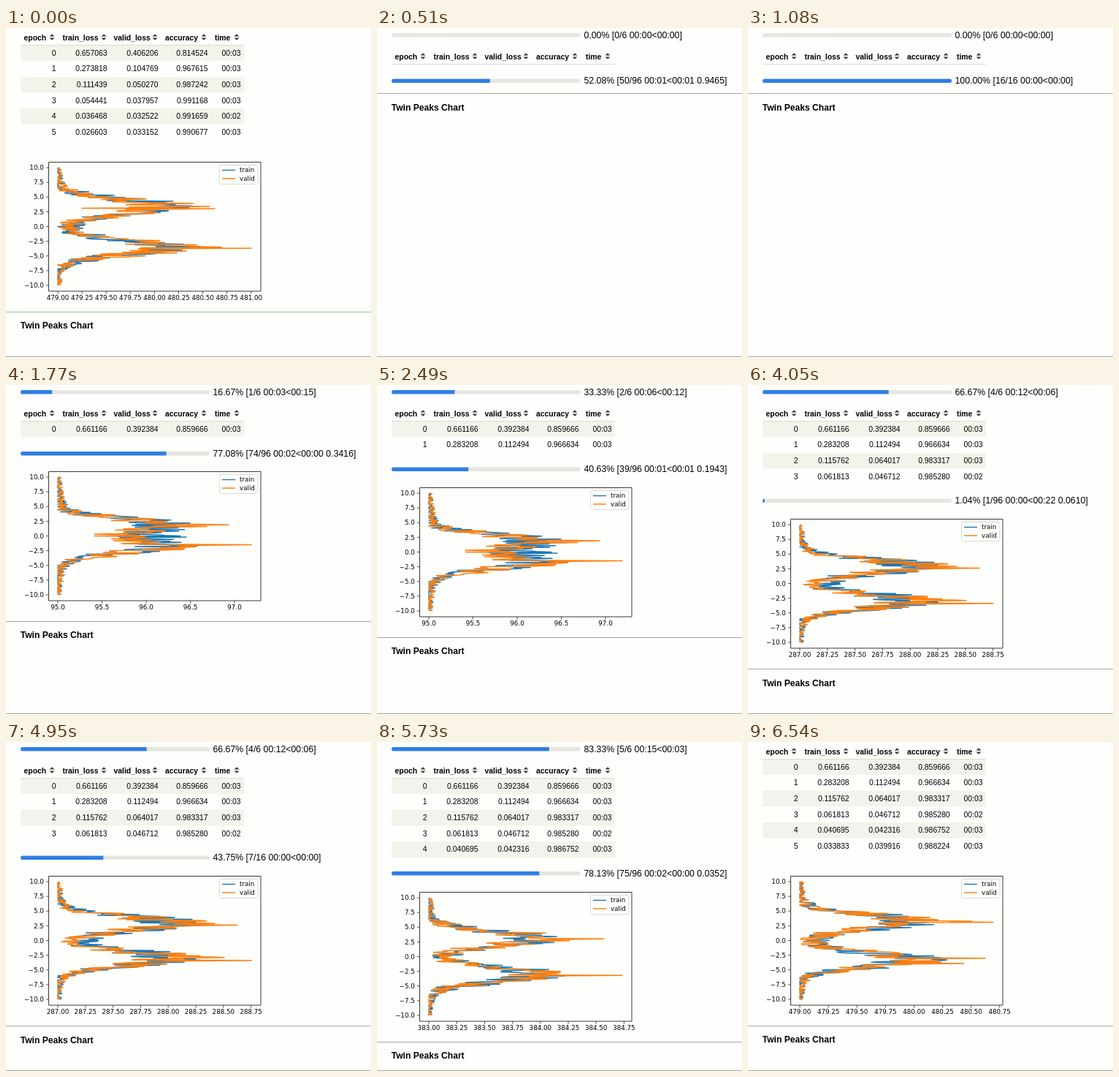
An HTML page with a canvas for the animation above (6.57 s loop, 500 by 450 pixels).

```html
<!DOCTYPE html>
<html lang="en">
<head>
<meta charset="utf-8">
<title>Twin Peaks Chart</title>
<style>
html, body { margin: 0; width: 100%; height: 100%; overflow: hidden; background: #fefefc; }
canvas { display: block; width: 500px; height: 450px; }
</style>
</head>
<body>
<canvas id="stage" width="500" height="450"></canvas>
<script>
const ctx = document.getElementById('stage').getContext('2d');
const LOOP = 6570;
const SANS = '"Liberation Sans", Arial, sans-serif';
const PLOT = '"DejaVu Sans", sans-serif';
const BLUE = '#1f77b4', ORANGE = '#ff7f0e', PAPER = '#fefefc', RULE = '#a8a8a0';
const ROW = 21.65;

// epoch start times; the last entry ends the run
const STARTS = [60, 1120, 2170, 3110, 4035, 5085, 6120];
const LOSS_BEND = [0.5, 0.96, 0.96, 0.96, 0.756, 0.96];

const OLD_ROWS = [
  ['0.657063', '0.406206', '0.814524', '00:03'],
  ['0.273818', '0.104769', '0.967615', '00:03'],
  ['0.111439', '0.050270', '0.987242', '00:03'],
  ['0.054441', '0.037957', '0.991168', '00:03'],
  ['0.036468', '0.032522', '0.991659', '00:02'],
  ['0.026603', '0.033152', '0.990677', '00:03']
];
const ROWS = [
  ['0.661166', '0.392384', '0.859666', '00:03'],
  ['0.283208', '0.112494', '0.966634', '00:03'],
  ['0.115762', '0.064017', '0.983317', '00:03'],
  ['0.061813', '0.046712', '0.985280', '00:02'],
  ['0.040695', '0.042316', '0.986752', '00:03'],
  ['0.033833', '0.039916', '0.988224', '00:03']
];

// left label, arrow centre, right edge of the cells
const COLS = [
  ['epoch', 24.5, 63, 68.5],
  ['train_loss', 77.5, 134, 138.5],
  ['valid_loss', 147.5, 204, 208.5],
  ['accuracy', 218, 271, 276.5],
  ['time', 286, 316, 321.5]
];

function random(seed) {
  return () => {
    seed = (seed * 16807) % 2147483647;
    return seed / 2147483647;
  };
}

function bell(x, w) { return Math.exp(-x * x / (2 * w * w)); }

// noisy counts: the spread grows with the root of the mean
function curve(seed, c, mid, spikes) {
  const rnd = random(seed);
  const pts = [];
  for (let i = 0; i <= 200; i++) {
    const y = 10 - i / 10;
    const mean = c.amp * (bell(y - c.up, c.w) + bell(y + c.down, c.w)) + mid * bell(y, 0.8) + 6 * bell(y, 5);
    const x = mean + 4.4 * Math.sqrt(mean) * (rnd() * 2 - 1);
    pts.push([Math.max(0, Math.min(225, x)), y]);
  }
  for (const [y, x] of spikes) pts[Math.round((10 - y) * 10)][0] = x;
  return pts;
}

function chart(seed, c) {
  c.train = curve(seed * 7919, c, c.mid, c.blue || []);
  c.valid = curve(seed * 104729, c, 4, c.spikes);
  return c;
}

const OLD_CHART = chart(11, { from: 479, step: 0.25, gap: 33.1, up: 3.4, down: 3.6, amp: 145, w: 1.25, mid: 6,
  spikes: [[3.4, 208], [3.1, 33], [3, 215], [-3.5, 224], [-3.7, 265]] });
const CHARTS = [
  chart(23, { from: 95, step: 0.5, gap: 60.5, up: 1.9, down: 1.8, amp: 135, w: 1.15, mid: 45,
    spikes: [[1.9, 234], [1.6, 204], [-1.5, 265], [-1.8, 190]] }),
  chart(37, { from: 191, step: 0.25, gap: 35.2, up: 2.6, down: 2.6, amp: 148, w: 1.15, mid: 35,
    spikes: [[2.7, 238], [2.4, 212], [-2.5, 205], [-2.9, 212]], blue: [[-2.7, 265]] }),
  chart(41, { from: 287, step: 0.25, gap: 37.8, up: 2.9, down: 3, amp: 155, w: 1.2, mid: 12,
    spikes: [[2.6, 246], [2.9, 215], [-2.9, 228], [-3.4, 265]] }),
  chart(53, { from: 383, step: 0.25, gap: 38.2, up: 3.1, down: 3.1, amp: 152, w: 1.2, mid: 10,
    spikes: [[3, 240], [-3.2, 265]] }),
  chart(67, { from: 479, step: 0.25, gap: 39.1, up: 3.2, down: 3.3, amp: 152, w: 1.22, mid: 6,
    spikes: [[3.1, 265], [3.3, 235], [-3, 254], [-3.9, 225]] })
];

function text(s, x, y, font, align = 'left', color = '#000') {
  ctx.font = font;
  ctx.textAlign = align;
  ctx.fillStyle = color;
  ctx.fillText(s, x, y);
}

function line(x1, y1, x2, y2, color, width = 1) {
  ctx.strokeStyle = color;
  ctx.lineWidth = width;
  ctx.beginPath();
  ctx.moveTo(x1, y1);
  ctx.lineTo(x2, y2);
  ctx.stroke();
}

function pill(x, y, w, h, r, color) {
  ctx.fillStyle = color;
  ctx.beginPath();
  ctx.roundRect(x, y, w, h, r);
  ctx.fill();
}

function triangle(x, y, dy) {
  ctx.beginPath();
  ctx.moveTo(x - 3.5, y);
  ctx.lineTo(x + 3.5, y);
  ctx.lineTo(x, y + dy);
  ctx.fill();
}

function bar(y, done, total, note) {
  const part = done / total;
  pill(20, y - 2.8, 259, 5.6, 2.8, '#e6e6e0');
  if (part > 0) {
    ctx.save();
    ctx.clip();
    ctx.fillStyle = '#2f7fe6';
    ctx.fillRect(20, y - 3, 259 * part, 6);
    ctx.restore();
  }
  text(`${(part * 100).toFixed(2)}% [${done}/${total} ${note}]`, 283.5, y + 4, '12.3px ' + SANS);
}

function table(y, rows) {
  for (const [name, x, arrow] of COLS) {
    text(name, x, y + 3.5, 'bold 10.4px ' + SANS);
    ctx.fillStyle = '#3c3c38';
    triangle(arrow, y - 1.4, -3.4);
    triangle(arrow, y + 0.4, 3.4);
  }
  const top = y + 10.5;
  rows.forEach((row, i) => {
    if (i % 2 === 0) {
      ctx.fillStyle = '#f3f3ec';
      ctx.fillRect(20, top + i * ROW, 306, ROW);
    }
    [i, ...row].forEach((cell, k) =>
      text(String(cell), COLS[k][3], top + i * ROW + 14.3, '10.4px ' + SANS, 'right'));
  });
  line(20, Math.round(top) - 0.5, 326, Math.round(top) - 0.5, '#dcdcd4');
}

function plotCurve(pts, top, color) {
  ctx.strokeStyle = color;
  ctx.lineWidth = 1.5;
  ctx.lineJoin = 'round';
  ctx.beginPath();
  for (const [x, y] of pts) ctx.lineTo(71 + x, top + 88.5 - y * 8.05);
  ctx.stroke();
}

function drawChart(c, top) {
  const font = '8.7px ' + PLOT;
  plotCurve(c.train, top, BLUE);
  plotCurve(c.valid, top, ORANGE);
  ctx.strokeStyle = '#222';
  ctx.lineWidth = 0.9;
  ctx.strokeRect(58.5, top + 0.5, 290.5, 176.5);
  for (let v = 10; v >= -10; v -= 2.5) {
    const y = top + 88.5 - v * 8.05;
    line(55, y, 58.5, y, '#222', 0.8);
    text((v < 0 ? '\u2212' : '') + Math.abs(v).toFixed(1), 51.7, y + 3.2, font, 'right');
  }
  for (let k = 0; 71 + k * c.gap < 347; k++) {
    const x = 71 + k * c.gap;
    line(x, top + 177, x, top + 180.5, '#222', 0.8);
    text((c.from + k * c.step).toFixed(c.step === 0.5 ? 1 : 2), x, top + 189.2, font, 'center');
  }
  pill(292.5, top + 4.5, 52.5, 26, 2, PAPER);
  ctx.strokeStyle = '#d8d8cc';
  ctx.lineWidth = 0.9;
  ctx.stroke();
  line(296, top + 11.5, 314, top + 11.5, BLUE, 1.4);
  line(296, top + 23, 314, top + 23, ORANGE, 1.4);
  text('train', 320, top + 14.3, font);
  text('valid', 320, top + 25.8, font);
}

function heading(y, color = RULE) {
  const edge = Math.floor(y) + 0.5;
  line(0, edge, 500, edge, color);
  text('Twin Peaks Chart', 19.7, y + 23, 'bold 12.1px ' + SANS);
}

function clock(s) { return '00:' + String(Math.floor(s)).padStart(2, '0'); }

function result(rows, c, color) {
  table(13, rows);
  drawChart(c, 183);
  heading(388, color);
}

function trainNote(e, v) {
  const spent = 0.21 + 0.026 * v;
  const before = e ? +ROWS[e - 1][0] : 2.4;
  const loss = before * Math.pow(ROWS[e][0] / before, Math.pow(v / 96, LOSS_BEND[e]));
  return `${clock(spent)}<${clock(spent / v * (96 - v))} ${loss.toFixed(4)}`;
}

function running(t) {
  let e = 0;
  while (t >= STARTS[e + 1]) e++;
  const dt = (t - STARTS[e]) / (STARTS[e + 1] - STARTS[e]) * 1050;
  bar(9.7, e, 6, `${clock(e * 3)}<${clock(e ? 18 - e * 3 : 0)}`);
  table(39, ROWS.slice(0, e));

  const y = 72.3 + e * 21.5;
  if (dt < 840) {
    const v = Math.max(1, Math.min(96, Math.floor((dt - 30) * 0.12)));
    bar(y, v, 96, trainNote(e, v));
  } else {
    bar(y, Math.min(16, Math.floor((dt - 840) / 10.5)), 16, '00:00<00:00');
  }

  if (e === 0) {
    heading(89.5);
    return;
  }
  const shown = Math.max(0, e - (dt >= 1008 ? 1 : 2));
  drawChart(CHARTS[shown], Math.round(96.6 + e * ROW));
  heading(301.5 + e * 21.75);
}

function draw(t) {
  ctx.fillStyle = PAPER;
  ctx.fillRect(0, 0, 500, 450);
  if (t < 30) result(OLD_ROWS, OLD_CHART, '#7fd67f');
  else if (t < STARTS[0]) heading(0);
  else if (t < STARTS[6]) running(t);
  else result(ROWS, CHARTS[4]);
  line(0, 449.5, 500, 449.5, RULE);
}

const begin = performance.now();
function tick() {
  draw((performance.now() - begin) % LOOP);
  requestAnimationFrame(tick);
}
tick();
</script>
</body>
</html>
```
